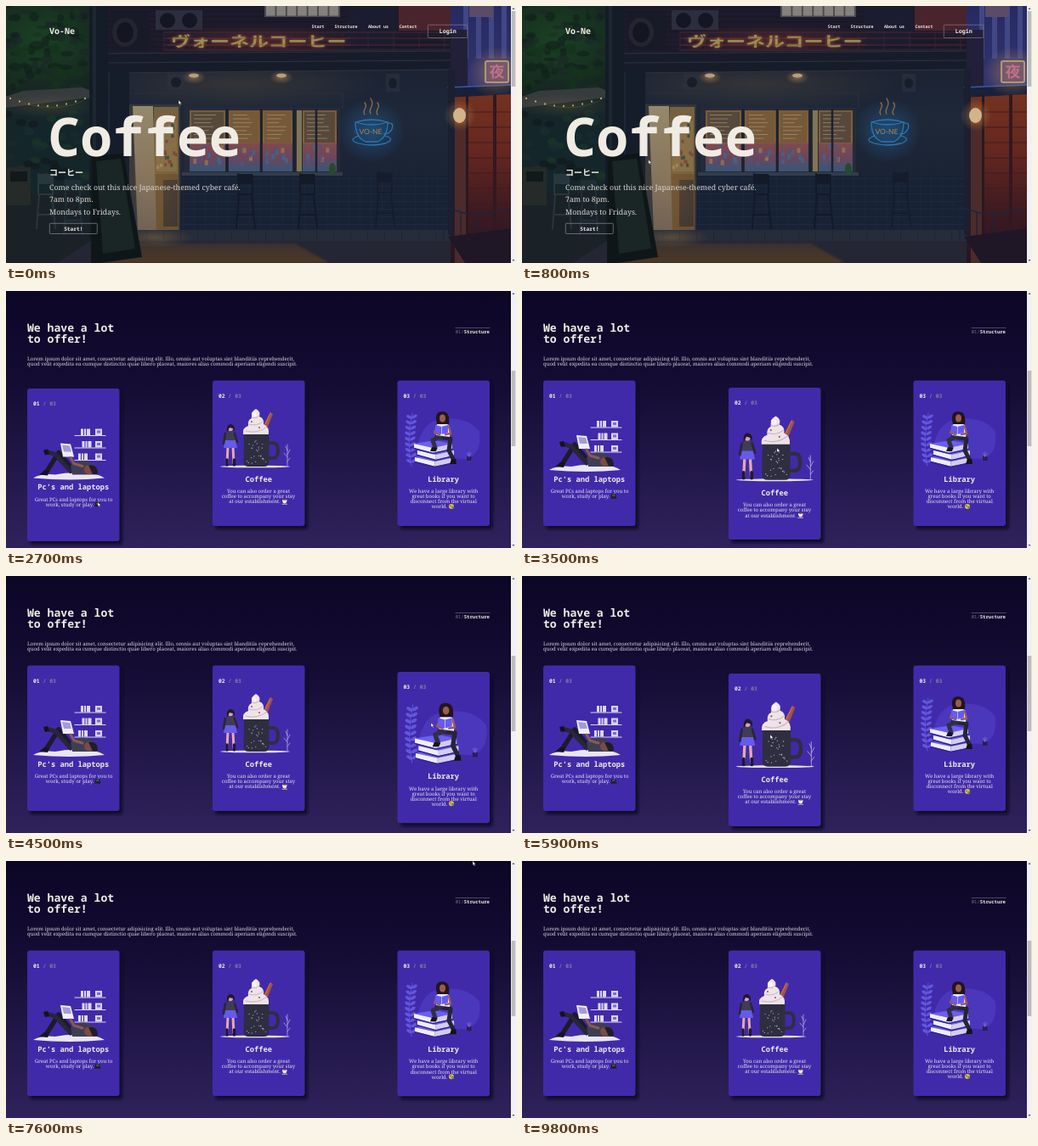
Animation of 600 by 303 pixels, one loop 9900 ms. Source, as an HTML page:

```html
<!DOCTYPE html>
<html lang="en">
<head>
<meta charset="utf-8">
<title>Coffee landing page</title>
<style>
html,body{margin:0;width:100%;height:100%;overflow:hidden;background:#0c0626}
svg{display:block;width:100%;height:100%}
text{text-rendering:geometricPrecision;white-space:pre}
.m{font-family:"Noto Sans Mono","DejaVu Sans Mono",monospace;font-weight:700}
.big{font-weight:600}
.s{font-family:"Noto Serif",serif;font-weight:300}
.j{font-family:"Noto Sans CJK JP","Noto Sans CJK",sans-serif;font-weight:700}
.neon{font-family:Lato,sans-serif}
</style>
</head>
<body>
<svg id="stage" viewBox="0 0 600 303" xmlns="http://www.w3.org/2000/svg"></svg>
<script>
const LOOP = 9900, JUMP = 2000, CREAM = '#f0ece4';
const stage = document.getElementById('stage');

let seed = 11;
const rnd = () => (seed = seed * 16807 % 2147483647) / 2147483647;
const pick = list => list[Math.floor(rnd() * list.length)];
const times = (n, fn) => Array.from({length: n}, (_, i) => fn(i)).join('');
const clamp = v => Math.max(0, Math.min(1, v));

const rect = (x, y, w, h, fill, more = '') =>
  `<rect x="${x}" y="${y}" width="${w}" height="${h}" fill="${fill}" ${more}/>`;
const poly = (pts, fill, more = '') => `<polygon points="${pts}" fill="${fill}" ${more}/>`;
const oval = (x, y, rx, ry, fill, more = '') =>
  `<ellipse cx="${x}" cy="${y}" rx="${rx}" ry="${ry}" fill="${fill}" ${more}/>`;
const line = (d, color, w = 1, more = '') =>
  `<path d="${d}" fill="none" stroke="${color}" stroke-width="${w}" stroke-linecap="round" stroke-linejoin="round" ${more}/>`;
const shape = (d, fill, more = '') => `<path d="${d}" fill="${fill}" ${more}/>`;
const text = (cls, x, y, size, str, fill = CREAM, more = '') =>
  `<text class="${cls}" x="${x}" y="${y}" font-size="${size}" fill="${fill}" ${more}>${str}</text>`;
const MID = 'text-anchor="middle"';
const fade = (id, stops, dir = 'x2="0" y2="1"') =>
  `<linearGradient id="${id}" ${dir}>${stops.map(([o, c]) =>
    `<stop offset="${o}" stop-color="${c}"/>`).join('')}</linearGradient>`;
const halo = (id, color, a) => `<radialGradient id="${id}"><stop offset="0" stop-color="${color}" stop-opacity="${a}"/>
  <stop offset="1" stop-color="${color}" stop-opacity="0"/></radialGradient>`;

const defs = `<defs>
${fade('night', [[0, '#0c0626'], [.35, '#140c33'], [1, '#2f225c']])}
${fade('wall', [[0, '#1b2130'], [.35, '#1e2839'], [1, '#171f30']])}
${fade('sky', [[0, '#262a63'], [1, '#33346e']])}
${fade('alley', [[0, '#74321f'], [.35, '#64261f'], [.7, '#3d1a22'], [1, '#231624']])}
${fade('pane', [[0, '#7a5b36'], [.5, '#84633f'], [.56, '#7d4a50'], [.78, '#6b465c'], [1, '#35577a']])}
${fade('door', [[0, '#96896a'], [.5, '#857662'], [1, '#6e6054']])}
${fade('floor', [[0, '#3a3130'], [1, '#4d3826']])}
${halo('warm', '#c08d55', .55)}${halo('red', '#b8402c', .45)}${halo('blue', '#2b86d8', .35)}${halo('gold', '#a07c40', .4)}
${halo('leaf', '#1c4a24', .8)}
<filter id="soft" x="-20%" y="-20%" width="150%" height="150%"><feGaussianBlur stdDeviation="1.7"/></filter>
<filter id="glow" x="-20%" y="-50%" width="140%" height="200%"><feGaussianBlur stdDeviation="2"/></filter>
</defs>`;

const stool = (x, y, c) => rect(x, y, 17, 12, c)
  + line(`M${x} ${y}v24h17v-22M${x + 1} ${y + 24}l-3 40M${x + 16} ${y + 24}l4 40M${x} ${y + 48}h18`, c, 2);

const garden = () => rect(0, 0, 125, 303, '#14201f')
  + oval(40, 40, 110, 80, 'url(#leaf)')
  + times(90, () => oval(rnd() * 98, rnd() * 98, 3 + rnd() * 6, 2 + rnd() * 4, pick(['#15331c', '#10201b', '#1a2628']), 'opacity=".6"'))
  + rect(0, 108, 98, 112, '#15262a')
  + times(36, () => oval(rnd() * 95, 122 + rnd() * 85, 6, 4, pick(['#193528', '#182a30', '#10191d']), 'opacity=".7"'))
  + rect(0, 220, 98, 83, '#1a2228')
  + poly('0,107 20,100 90,96 104,101 98,108 0,120', '#363b3d')
  + line('M0 106Q55 133 98 108', '#4a4330', .6)
  + times(9, i => oval(5 + i * 11, 107 + 11 * Math.sin((i + .5) / 9 * Math.PI), 1, 1.2, '#c9ad68'))
  + oval(50, 118, 60, 14, 'url(#gold)', 'opacity=".5"')
  + rect(1, 190, 28, 45, '#262a28') + rect(5, 195, 20, 12, '#12191a')
  + stool(38, 198, '#28373d') + stool(70, 205, '#202f36');

const storey = () => rect(120, 0, 405, 57, '#1d1b2b')
  + times(9, i => rect(120, i * 6, 405, .7, '#151524'))
  + rect(462, 0, 62, 29, '#4a242c') + rect(402, 2, 58, 45, '#1b1c2f')
  + rect(304, 0, 89, 13, '#4b4a50') + times(7, i => rect(306 + i * 12.4, 0, 10.5, 11.5, '#85817c'))
  + rect(123, 7, 46, 45, '#191a28') + oval(140, 31, 15, 17, '#242530') + oval(140, 31, 10, 12, '#141520')
  + rect(176, 5, 55, 23, '#2c2d3d') + oval(190, 17, 9, 9, '#151623') + oval(216, 17, 9, 9, '#151623');

const sign = () => {
  const name = (color, more = '') => text('j', 194, 48, 23, 'ヴォーネルコーヒー', color, more);
  return oval(297, 41, 125, 20, 'url(#red)', 'opacity=".6"')
    + line('M186 31h335M186 38h335M186 46h335M186 52h335', '#512a35', .9)
    + times(12, i => line(`M${186 + i * 30} 31v21`, '#3d2532', .9))
    + `<g transform="translate(0 12) scale(1 .75)">${name('#a5553a', 'filter="url(#glow)"')}${name('#98904f')}</g>`
    + line('M190 38h215M190 46h215', '#6a3238', .6);
};

function shop() {
  const panes = [[216, 42], [262, 37], [302, 35], [349, 40]];
  return rect(120, 55, 405, 215, 'url(#wall)')
    + oval(275, 92, 170, 32, 'url(#gold)', 'opacity=".45"')
    + poly('120,55 525,52 525,74 120,79', '#171c2b')
    + line('M120 56L525 53M120 67L525 64M120 79L525 75', '#30353f', .9)
    + rect(98, 0, 22, 225, '#141c27') + rect(102, 0, 4, 225, '#1d2731') + rect(122, 78, 23, 195, '#151c2a')
    + line('M150 103H396V120', '#2b313d', 1.2)
    + rect(190, 80, 20, 19, '#2a3039') + oval(200, 90, 6, 6, '#181d28')
    + rect(447, 80, 16, 21, '#262d3a') + oval(455, 91, 5, 6, '#171d2a')
    + [221, 324].map(x => oval(x, 84, 14, 8, 'url(#warm)') + oval(x, 82, 6, 2.4, '#b3a07c')).join('')
    // door
    + rect(145, 116, 60, 152, '#34363a') + rect(174, 119, 29, 148, '#756040') + rect(177, 135, 24, 60, '#846d48')
    + times(22, () => rect(176 + rnd() * 23, 128 + rnd() * 65, 3, 4, pick(['#a08a5e', '#3c4a3c', '#7a4638'])))
    + rect(174, 198, 29, 69, '#6b5132') + rect(185, 205, 17, 55, '#423931')
    + poly('149,118 173,118 177,267 155,267', 'url(#door)')
    + oval(174, 200, 40, 75, 'url(#gold)', 'opacity=".5"')
    // windows
    + rect(210, 120, 183, 78, '#252b36')
    + panes.map(([x, w], i) => rect(x, 123, w, 72, 'url(#pane)')
      + rect(x + 2, 125, w - 4, 36, i % 3 ? '#765938' : '#57483c')
      + times(7, k => rect(x + 5, 128 + k * 4.6, w * (.4 + rnd() * .3), .9, '#aa9b7a', 'opacity=".7"'))
      + times(9, () => rect(x + 2 + rnd() * (w - 7), 163 + rnd() * 24, 4, 6, pick(['#9a7350', '#3c6790', '#56507a']), 'opacity=".8"'))).join('')
    + line('M260 122v75M300 122v75M339 122v75M365 122v75', '#1b2230', 2.5) + rect(342, 123, 6, 72, '#7f7656')
    + rect(207, 196, 189, 4, '#343c48') + rect(206, 200, 316, 64, '#182235')
    + times(7, i => rect(206, 203 + i * 9, 316, .5, '#223047')) + times(24, i => rect(208 + i * 13, 200, .5, 64, '#1e2a40'))
    + oval(384, 192, 4, 7, '#27492f')
    // floor and furniture
    + rect(120, 264, 405, 13, '#262c3a') + times(20, i => rect(125 + i * 20, 265, .6, 12, '#1a2130'))
    + poly('100,277 560,277 600,303 60,303', '#242733')
    + poly('125,280 340,280 380,303 110,303', 'url(#floor)', 'filter="url(#soft)"')
    + oval(175, 273, 45, 12, 'url(#gold)')
    + stool(273, 198, '#131a28') + stool(346, 198, '#131a28') + stool(437, 196, '#151d2c')
    + poly('101,177 138,174 160,296 112,303 100,303', '#0f1618') + poly('106,183 135,180 152,286 114,292', '#1a2526')
    // neon cup
    + oval(430, 147, 40, 38, 'url(#blue)') + oval(429, 147, 20, 12, '#1b4c78', 'opacity=".4"')
    + line('M422 128c-4-6 5-8 0-14M429 127c-4-6 6-9 0-18M437 128c-4-6 5-8 0-14', '#a5713f', 1.2)
    + line('M411 137q19-6 38 0q0 18-12 23h-14q-12-5-12-23zM411 137q19 6 38 0M449 138q8-1 5 7q-3 6-9 6M415 153q-14 5 0 9q15 4 31 0q13-5 0-9', '#2b78ad', 1.3)
    + text('neon', 429, 150.5, 8.5, 'VO-NE', '#b58446', MID);
}

const alley = () => rect(523, 0, 72, 100, 'url(#sky)')
  + times(4, i => rect(538 + i * 15, 0, 6, 62, '#414784')) + rect(545, 0, 28, 13, '#5b4a68')
  + rect(523, 28, 20, 72, '#221f38') + rect(523, 104, 72, 199, 'url(#alley)')
  + poly('519,96 595,93 595,104 519,108', '#1a2039') + line('M520 96L595 93', '#3b5b98', 1.4)
  + oval(577, 78, 34, 30, 'url(#warm)')
  + rect(564, 65, 27, 25, '#76596b', 'rx="2" stroke="#b09873" stroke-width="2"') + text('j', 577.5, 84, 18, '夜', '#c07287', MID)
  + rect(520, 75, 8, 195, '#1c1f2f') + rect(528, 140, 14, 163, '#4c2b2a') + rect(541, 104, 3, 199, '#2a1820')
  + times(7, i => line(`M544 ${125 + i * 18}h51`, '#3f1a20', 1)) + rect(573, 104, 4, 199, '#331821')
  + oval(534, 129, 19, 19, 'url(#warm)') + oval(533.5, 129, 7.5, 9, '#d3b48a')
  + line('M500 232L545 246L595 240M515 235v40M535 243v40M555 245v40', '#20233a', 1.4)
  + poly('520,272 595,262 595,303 540,303', '#1f1725');

function hero() {
  const nav = [[359.5, 'Start'], [386.5, 'Structure'], [426, 'About us'], [462.5, 'Contact']];
  return `<g id="hero">${garden()}${storey()}${sign()}${shop()}${alley()}`
    + text('m', 51, 33, 10, 'Vo-Ne')
    + nav.map(([x, s]) => text('m', x, 26, 5, s)).join('')
    + rect(496.3, 22.3, 46.5, 15.2, 'none', 'rx="1" stroke="#7f7b86" stroke-width=".7"')
    + text('m', 519.7, 32.4, 6.7, 'Login', CREAM, MID)
    + text('m big', 49.5, 177, 63, 'Coffee')
    + text('j', 51, 200, 10, 'コーヒー')
    + ['Come check out this nice Japanese-themed cyber café.', '7am to 8pm.', 'Mondays to Fridays.']
      .map((s, i) => text('s', 51, 217 + i * 14.4, 8.78, s, '#d9d6d2')).join('')
    + rect(51.3, 256.3, 56, 12.2, '#4129a8', 'id="btn" rx="1" stroke-width=".7"')
    + `<g id="btnText">${text('m', 79.3, 264.8, 6.2, 'Start!', 'inherit', MID)}</g></g>`;
}

const shelfBooks = y => line(`M81 ${y}h36`, '#d9d4ea', 1.1)
  + [[85, 3], [89, 2], [92, 4]].map(([x, w]) => rect(x + (y % 2) * 3, y - 8, w, 7.5, '#dcd8ee')).join('')
  + rect(105, y - 8, 8, 7.5, '#d8d2ec') + rect(107, y - 6, 4, 3, '#7d6cd0');

const reader = () => [161, 175.5, 190].map(shelfBooks).join('')
  + shape('M32 211q10-6 26-4q20-4 34-1q15-1 24 5q-40 4-84 0z', '#e9e6f2')
  + line('M80 203L62 181L48 203', '#1d1a2c', 5.5) + line('M76 203L58 183L47 180', '#29263a', 5)
  + shape('M44 178l5-1l2 6l-5 1zM45 202l6 1l-2 5l-10-1z', '#15121f')
  + shape('M76 196q12-9 24-3q9 4 8 14h-30z', '#3f3d56')
  + poly('64,170 76,171 80,186 67,186', '#f0eef8') + poly('66,172 75,173 77,180 68,180', '#a49bd8')
  + line('M90 197l-10-3l-4-7', '#8d5a4c', 3)
  + oval(98, 201, 6, 5.5, '#7b4b42') + shape('M97 196q11-2 11 10q-7 2-8-4z', '#1f1c2d');

const mug = () => oval(293, 207, 41, 1.3, '#e6e2f0')
  + line('M308 179h6q6 0 6 9t-6 9h-7', '#2f2e41', 4)
  + shape('M280 168h29.5v33q0 6-6 6h-18q-6 0-6-6z', '#2f2e41')
  + times(26, () => oval(282.5 + rnd() * 24, 175 + rnd() * 30, .6, .6, '#b7b0c8'))
  + poly('303,158 311,143 314,145 308,160', '#a5533d') + line('M311 144l-6 13', '#d58a68', .7)
  + shape('M279 169q-1-8 6-10q-1-7 4-9q-1-8 5-11q6 3 4 9q6 2 5 9q7 3 6 12z', '#eee3e6')
  + line('M282 165q14 4 25-5M286 157q9 3 16-3M289 149q6 2 9-2', '#c9b4c5', 1)
  + oval(292, 145, 3, 3, '#f8f2f3') + oval(298, 161, 1, 1, '#a5533d') + oval(289, 154, 1, 1, '#a5533d')
  + line('M261 184l-1 20M267 184l1 19', '#e5a9a8', 3) + line('M260 199v6M268.5 199v6', '#1d1a2c', 3.4)
  + shape('M257 183l2-16q5-4 10 0l2 17q-8 2-14-1z', '#3f3d56') + shape('M257 176h13l2 9h-16z', '#655bea')
  + line('M258 168l-2 12M269 168l3 10', '#29263a', 2.6)
  + oval(264, 161.5, 3, 3.8, '#dca3a0') + shape('M260 167q-1-11 5-10q5 1 4 9l-2-4l-4-1z', '#1d1a2c')
  + line('M331 206v-25M331 196l-4-5M331 193l3-6M331 201l3-4M331 188l-2-5', '#bdb5d8', .7);

const leaf = i => {
  const y = 150 + i * 6.5, x = 477 - Math.sin(i / 8 * Math.PI) * 2;
  return oval(x - 3, y, 3.6, 1.8, '#6257dc', `transform="rotate(30 ${x} ${y})"`)
    + oval(x + 4, y, 3.6, 1.8, '#6257dc', `transform="rotate(-30 ${x} ${y})"`);
};
const book = (x, y, w) => poly(`${x},${y} ${x + w * .55},${y - 4} ${x + w},${y} ${x + w * .5},${y + 5}`, '#6a5ff0')
  + poly(`${x},${y} ${x + w * .5},${y + 5} ${x + w * .5},${y + 11} ${x},${y + 5}`, '#f0edf8')
  + poly(`${x + w * .5},${y + 5} ${x + w},${y} ${x + w},${y + 6} ${x + w * .5},${y + 11}`, '#d4cdeb')
  + line(`M${x} ${y + 5.5}l${w * .5} 6l${w * .5}-5`, '#30229a', 1.4);

const library = () => shape('M482 196q4-40 26-44q34-6 49 14q3 26-15 32z', '#4b37bb')
  + line('M477 206q-6-30 1-62', '#6257dc', .9) + times(9, leaf)
  + book(481, 196, 47) + book(484, 188, 43) + book(480, 180, 45)
  + line('M507 172l16 2l-2 14l6 12', '#26233a', 5) + line('M515 170l-13 6l3 9', '#312e45', 5)
  + shape('M524 198l5 0l1 6h-8zM501 184l6 1l-1 4h-7z', '#15121f')
  + shape('M506 170q-2-14 4-14h7q7 1 5 16z', '#ece8f4')
  + shape('M507 157q-4-15 6-15q10 0 8 15z', '#20151f') + oval(513.5, 150, 3.5, 4.5, '#9a5c4d')
  + line('M507 160l-3 7l6 2M521 160l2 8l-6 1', '#9a5c4d', 2.4)
  + poly('505,158 512.5,160 520,158 520,167 512.5,169 505,167', '#655bf0') + line('M512.5 160v9', '#d8d4f4', .7)
  + rect(542, 195, 5.5, 5, '#29204f') + line('M544.5 195l-2-4M545 195l2-4M544.7 195v-5', '#7a70dc', .8);

const icons = [
  () => rect(105, 239.5, 5.5, 3.5, '#1a1c1e') + rect(106, 240.2, 3.5, 2, '#35613d') + rect(104.3, 243.3, 7, 1.2, '#141416'),
  () => shape('M325 246h5.5q0 4.5-2.7 4.5t-2.8-4.5z', '#eee9df') + oval(327.7, 246, 2.5, .8, '#7d5130') + line('M325 251.3h5.6', '#dcd5c8', .8),
  () => oval(524, 254, 3, 3, '#e2bf48') + oval(525.5, 255, 1.6, 1.6, '#5f8f4d') + oval(523, 253.3, .6, .7, '#2c2517')
];

const cards = [
  {x: 25, title: "Pc's and laptops", art: reader, zoom: 0, hover: [[2000, 3100]],
    copy: [['Great PCs and laptops for you to', 79.5], ['work, study or play.', 75]]},
  {x: 243, title: 'Coffee', art: mug, zoom: 1, hover: [[3250, 3650], [5300, 6650]],
    copy: [['You can also order a great', 297], ['coffee to accompany your stay', 297], ['at our establishment.', 292.5]]},
  {x: 460.5, title: 'Library', art: library, zoom: 1, hover: [[4300, 5050], [6800, 7250]],
    copy: [['We have a large library with', 514.7], ['great books if you want to', 514.7],
      ['disconnect from the virtual', 514.7], ['world.', 510]]}
];

const cardMarkup = (c, i) => `<g id="card${i}">`
  + rect(c.x + 3.5, 109.5, 108.5, 171.5, '#0d0822', 'class="box" rx="3" opacity=".9" filter="url(#soft)"')
  + rect(c.x, 105.5, 108.5, 171.5, '#412aa9', 'class="box" rx="3"')
  + text('m', c.x + 7, 125.5, 6.4, `0${i + 1}<tspan fill="#8577a8"> / 03</tspan>`)
  + `<g class="art">${c.art()}</g><g class="copy">`
  + text('m', c.x + 54.2, 224.7, 8.75, c.title, CREAM, MID)
  + c.copy.map(([s, x], k) => text('s', x, 238.3 + k * 6.05, 6, s, '#e6e1ee', MID)).join('')
  + icons[i]() + '</g></g>';

const offers = () => '<g id="offers">' + rect(0, 0, 600, 303, 'url(#night)')
  + text('m', 25, 47.5, 13.1, 'We have a lot') + text('m', 25, 60.5, 13.1, 'to offer!')
  + line('M529 43.5h40', '#77718a', .6)
  + text('m', 528.7, 49.5, 5.6, '<tspan fill="#77718a" font-weight="400">01/</tspan>Structure')
  + text('s', 25, 82, 6.03, 'Lorem ipsum dolor sit amet, consectetur adipisicing elit. Illo, omnis aut voluptas sint blanditiis reprehenderit,', '#d9d4dd')
  + text('s', 25, 88.3, 6.03, 'quod velit expedita ea cumque distinctio quae libero placeat, maiores alias commodi aperiam eligendi suscipit.', '#d9d4dd')
  + cards.map(cardMarkup).join('') + '</g>';

const scrollbar = rect(594, 0, 6, 303, '#f1f1f1') + rect(594.7, 6, 4.6, 89, '#bcbcbc', 'id="thumb"')
  + poly('595.5,4 597,2 598.5,4', '#555') + poly('595.5,299 597,301 598.5,299', '#555');
const pointer = '<g id="pointer">'
  + shape('M0 0v5l1.2-1l.9 1.9l.9-.4l-.9-1.8h1.6z', '#fff', 'id="arrow" stroke="#111" stroke-width=".35"')
  + shape('M0 0q.9-.6 1.3.3v2.4l3 .8q.6 2-.6 4h-2.9l-2.3-3q.5-.8 1.5.2z', '#fff', 'id="hand" stroke="#111" stroke-width=".4"')
  + '</g>';

stage.innerHTML = defs + hero() + offers() + scrollbar + pointer;

const $ = id => document.getElementById(id);
const show = (el, on) => el.setAttribute('display', on ? 'inline' : 'none');
const parts = cards.map((c, i) => {
  const root = $('card' + i);
  return {root, boxes: root.querySelectorAll('.box'), art: root.querySelector('.art'), copy: root.querySelector('.copy')};
});

const track = [[0, 203, 111], [300, 198, 120], [1400, 84, 262], [1900, 80, 263], [2700, 108, 249], [3100, 138, 210],
  [3500, 300, 185], [4300, 475, 172], [4500, 500, 173], [5000, 485, 185], [5400, 335, 190], [5900, 292, 187],
  [6500, 305, 170], [6900, 480, 155], [7300, 540, 60], [7600, 549, 0], [7900, 555, -12]];

function pointerAt(t) {
  const k = track.findIndex(p => p[0] > t);
  if (k < 0) return track[track.length - 1].slice(1);
  const [t0, x0, y0] = track[k - 1], [t1, x1, y1] = track[k];
  const u = (t - t0) / (t1 - t0), e = u * u * (3 - 2 * u);
  return [x0 + (x1 - x0) * e, y0 + (y1 - y0) * e];
}

const ease = u => 1 - Math.pow(1 - clamp(u), 2.3);
const lift = (spans, t) => spans.reduce((v, [on, off]) => v + ease((t - on) / 400) - ease((t - off) / 400), 0);

function render(t) {
  const first = t < JUMP, over = first && t >= 1400;
  show($('hero'), first);
  show($('offers'), !first);
  $('thumb').setAttribute('y', first ? 6 : 94);

  $('btn').setAttribute('fill-opacity', over ? 1 : 0);
  $('btn').setAttribute('stroke', over ? '#4129a8' : '#8d8992');
  $('btnText').setAttribute('fill', over ? '#17112f' : CREAM);

  cards.forEach((c, i) => {
    const p = lift(c.hover, t), q = p * c.zoom, s = 1 + .12 * q, el = parts[i];
    el.root.setAttribute('transform', `translate(0 ${9.5 * p})`);
    el.boxes.forEach(b => b.setAttribute('height', 171.5 + 8.5 * p));
    el.art.setAttribute('transform', `translate(${c.x + 10} 139) scale(${s}) translate(${-c.x - 10} -139)`);
    el.copy.setAttribute('transform', `translate(0 ${8.5 * q})`);
  });

  const [x, y] = pointerAt(t);
  $('pointer').setAttribute('transform', `translate(${x} ${y})`);
  show($('arrow'), !over);
  show($('hand'), over);
}

function tick() {
  render(Math.floor(performance.now() % LOOP / 100) * 100);
  requestAnimationFrame(tick);
}
tick();
</script>
</body>
</html>
```
